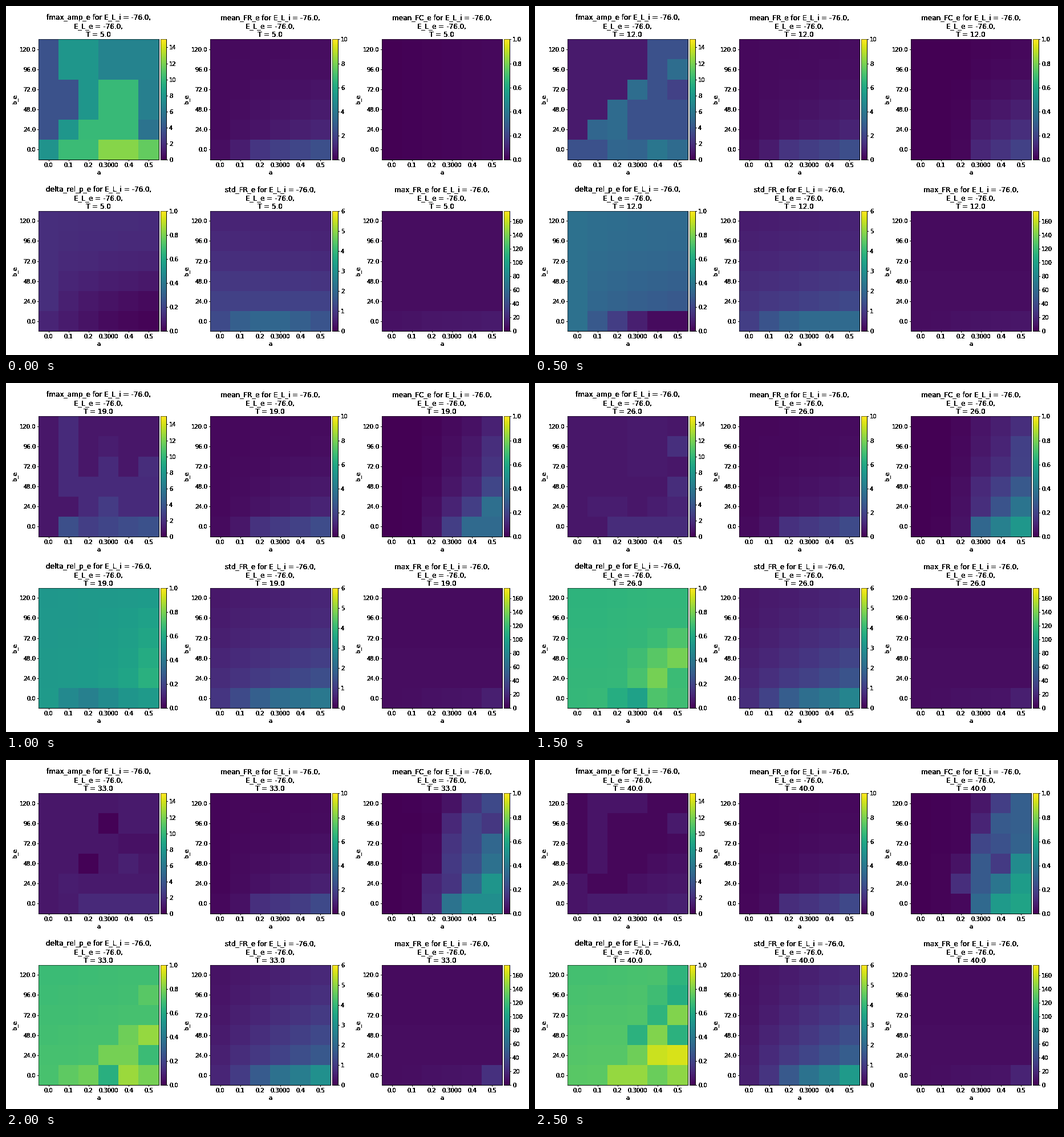
Animation, 917 px wide and 611 px high, one loop 3 s. Source, as a matplotlib script:

```python
import numpy as np
import matplotlib.pyplot as plt
from matplotlib.animation import FuncAnimation

W, H, DPI = 917, 611, 64
N, FRAMES = 6, 6
SIDE = 210.6
LEFTS, TOPS = (57, 358, 659), (58.4, 358.8)
ROW = np.arange(N)
COL = ROW / (N - 1)


def pt(px):
    return px * 72 / DPI


plt.rcParams.update({
    "font.family": "DejaVu Sans",
    "font.size": pt(10),
    "axes.titlesize": pt(12),
    "axes.titlepad": pt(4.17),
    "axes.labelpad": pt(2.78),
    "axes.linewidth": pt(0.556),
})
for axis in ("xtick", "ytick"):
    plt.rcParams.update({
        f"{axis}.major.size": pt(2.43),
        f"{axis}.major.pad": pt(2.43),
        f"{axis}.major.width": pt(0.556),
    })


def put(grid, patches):
    """Each patch is (row or rows, first column, values along the row)."""
    for row, col, vals in patches:
        grid[row, col:col + len(vals)] = vals
    return grid


def mix(a, b, u):
    return a + (b - a) * u


def surface(left, right):
    """Straight ramp along each row between two edge profiles."""
    return mix(left[:, None], right[:, None], COL[None, :])


# Grids run from b_e = 120 (row 0) down to b_e = 0 (row 5).
def amp_start():
    return put(np.full((N, N), 3.8), [
        (slice(0, 2), 1, [7.9] * 2 + [6.7] * 3),
        (slice(2, 4), 2, [7.9] + [10.1] * 2 + [6.4]),
        (4, 1, [7.9] + [10.1] * 3 + [5.7]),
        (5, 0, [7.7] + [10.2] * 2 + [12.3] * 2 + [11.4]),
    ])


def amp_diagonal():
    grid = np.full((N, N), 1.0)
    for row, first in enumerate((4, 4, 4, 3, 3, 0)):
        grid[row, first:] = 3.7
    return put(grid, [
        (1, 5, [5.3]), (2, 3, [5.3]), (2, 5, [2.9]), (3, 2, [5.2]),
        (4, 1, [4.9, 5.2]), (5, 2, [4.9, 4.8, 5.9, 5.2]),
    ])


def amp_branch():
    grid = np.full((N, N), 0.9)
    grid[:4, 1] = grid[3:5, 2:] = 1.8
    return put(grid, [
        (1, 3, [1.2]), (2, 3, [1.8]), (2, 5, [1.9]),
        (4, 3, [2.6]), (5, 1, [3.6, 2.7, 3.1, 3.4, 3.7]),
    ])


def amp_corner():
    grid = np.full((N, N), 0.9)
    grid[:3, 3:5] = 1.0
    grid[5, 2:] = 1.85
    return put(grid, [
        (1, 5, [2.0]), (3, 5, [1.9]), (4, 1, [1.2] * 2),
        (4, 4, [1.2, 1.5]),
    ])


def amp_holes():
    grid = np.full((N, N), 0.9)
    grid[:2, 4:] = grid[4, 2:] = 1.0
    grid[5, 2:] = 1.7
    return put(grid, [
        (1, 3, [0.1]), (2, 4, [0.7] * 2), (3, 2, [0.1]), (3, 4, [1.3]),
        (4, 1, [1.2]), (5, 1, [1.1]),
    ])


def amp_end():
    grid = np.full((N, N), 0.25)
    grid[:4, 1] = grid[0, 2:4] = grid[4:, 0] = 0.8
    grid[5, 1:] = 1.1
    return put(grid, [
        (1, 5, [1.0]), (2, 5, [0.4]), (3, 4, [0.5, 0.7]),
        (4, 3, [0.6, 0.8, 0.9]), (5, 5, [1.3]),
    ])


AMP = (amp_start, amp_diagonal, amp_branch, amp_corner, amp_holes, amp_end)


def fmax_amp(k):
    return AMP[k]()


def mean_rate(k):
    slope = 0.1 + 0.04 * ROW ** 2
    grid = 0.25 - 0.025 * k + np.outer(slope, COL)
    first = np.array([0.38, 0.8, 1.55, 1.85, 2.1, 2.4])
    last = np.array([0.18, 0.35, 1.28, 1.45, 1.72, 2.15])
    grid[5] = mix(first, last, k / 5)
    return grid


# Profile at a = 0.5, shares of it at a = 0.2 to 0.4, exceptions.
FC = [
    (0.02 + 0.007 * ROW ** 2, [0.1, 0.55, 0.75], []),
    ([0.09, 0.13, 0.15, 0.21, 0.36, 0.34], [0.1, 0.27, 0.5],
     [(5, 2, [0.05, 0.18, 0.34])]),
    (0.13 + 0.016 * ROW ** 2, [0.14, 0.42, 0.66],
     [(1, 4, [0.1, 0.19]), (4, 2, [0.04, 0.13]), (5, 2, [0.05, 0.33, 0.43])]),
    ([0.22, 0.16, 0.33, 0.37, 0.52, 0.49], [0.07, 0.45, 0.65],
     [(0, 3, [0.05]), (1, 3, [0.11, 0.21]), (4, 2, [0.1, 0.15]),
      (5, 2, [0.11, 0.38, 0.49])]),
    ([0.3, 0.3, 0.31, 0.48, 0.55, 0.58], [0.04, 0.58, 0.8],
     [(0, 3, [0.06, 0.18]), (1, 3, [0.1, 0.28]), (2, 3, [0.21]),
      (3, 2, [0.05, 0.28, 0.17]), (4, 2, [0.13, 0.28, 0.39]),
      (5, 4, [0.54])]),
]


def mean_fc(k):
    if k == 0:
        return np.tile(0.02 * COL, (N, 1))
    edge, shares, patches = FC[k - 1]
    return put(np.outer(edge, [0, 0.02] + shares + [1]), patches)


POWER = {
    2: [(5, 1, [0.47, 0.43, 0.48, 0.52, 0.54])],
    3: [(2, 4, [0.68, 0.72]), (3, 3, [0.69, 0.74, 0.79]),
        (4, 3, [0.71, 0.79, 0.68]), (5, 2, [0.62, 0.57, 0.72, 0.69])],
    4: [(1, 5, [0.74]), (3, 4, [0.78, 0.84]), (4, 3, [0.79, 0.79, 0.68]),
        (5, 1, [0.75, 0.78, 0.63, 0.85, 0.79])],
    5: [(0, 5, [0.65]), (1, 4, [0.69, 0.62]), (2, 4, [0.65, 0.81]),
        (3, 3, [0.64, 0.81, 0.64]), (4, 3, [0.78, 0.92, 0.94]),
        (5, 2, [0.84, 0.84, 0.77, 0.83])],
}


def rel_power(k):
    level = (0.13, 0.37, 0.53, 0.645, 0.68, 0.7)[k]
    if k == 0:
        grid = level - np.outer(0.01 + 0.006 * ROW ** 2, COL ** 0.55)
        grid[5] = 0.01 + 0.09 * (1 - COL) ** 1.6
        return grid
    if k == 1:
        grid = level - np.outer(0.03 + 0.004 * ROW ** 2, COL ** 0.55)
        grid[5] = 0.03 + 0.34 * np.clip(1 - 1.4 * COL, 0, 1)
        return grid
    grid = level + 0.002 * (k - 1) * ROW[:, None] + 0.015 * COL[None, :]
    if k == 2:
        grid += 0.02 * np.outer(ROW, COL ** 4)
    return put(grid, POWER[k])


def std_rate(k):
    u = k / (FRAMES - 1)
    left = mix(0.6 + 0.07 * ROW + 0.017 * ROW ** 2,
               0.25 + 0.012 * ROW ** 2, u ** 0.6)
    right = mix(0.55 + 0.04 * ROW ** 2,
                0.7 + 0.13 * ROW + 0.033 * ROW ** 2, u)
    grid = surface(left, right)
    first = np.array([1.35, 1.8, 1.95, 1.95, 1.8, 1.55])
    last = np.array([0.5, 0.9, 1.65, 2.25, 2.65, 3.25])
    grid[5] = mix(first, last, u ** 0.75)
    return grid


def max_rate(k):
    grid = np.full((N, N), 5.5 - 0.1 * k)
    grid[3:5] += 0.5
    grid[5] = (6 if k else 8) + 4 * COL
    grid[5, 5] = (12, 10, 15, 15, 24, 17)[k]
    return grid


# name, data, colour limit, colour bar step
PANELS = [
    ("fmax_amp_e", fmax_amp, 15, 2),
    ("mean_FR_e", mean_rate, 10, 2),
    ("mean_FC_e", mean_fc, 1, 0.2),
    ("delta_rel_p_e", rel_power, 1, 0.2),
    ("std_FR_e", std_rate, 6, 1),
    ("max_FR_e", max_rate, 175, 20),
]


def harden(img, dpi):
    """Make soft edges solid."""
    out = img.copy()
    out[..., 3] = out[..., 3] > 0.15
    return np.clip(out + 0.5 / 255, 0, 1), 0, 0


def add_axes(x, y, w):
    ax = fig.add_axes([x / W, 1 - (y + SIDE) / H, w / W, SIDE / H])
    ax.patch.set_visible(False)
    ax.set_agg_filter(harden)
    return ax


def add_panel(i, data, vmax, step):
    x, y = LEFTS[i % 3], TOPS[i // 3]
    ax = add_axes(x, y, SIDE)
    mesh = ax.pcolormesh(data(0), cmap="viridis", vmin=0, vmax=vmax)
    ax.set_ylim(N, 0)
    names = [f"{j / 10:.1f}" for j in range(N)]
    names[3] = "0.3000"
    ax.set_xticks(ROW + 0.5, names)
    ax.set_yticks(ROW + 0.5, [f"{24 * j:.1f}" for j in ROW[::-1]])
    ax.set_xlabel("a")
    ax.set_ylabel("b_e")
    cax = add_axes(x + SIDE + 2.9, y, 10.6)
    fig.colorbar(mesh, cax=cax, ticks=np.arange(0, vmax + step / 100, step))
    return ax, mesh


fig = plt.figure(figsize=(W / DPI, H / DPI), dpi=DPI, facecolor="white")
views = [add_panel(i, *panel[1:]) for i, panel in enumerate(PANELS)]


def draw(k):
    for (ax, mesh), (name, data, _, _) in zip(views, PANELS):
        mesh.set_array(data(k))
        ax.set_title(f"{name} for E_L_i = -76.0,\nE_L_e = -76.0,\nT = {5 + 7 * k:.1f}")
    return [mesh for _, mesh in views]


anim = FuncAnimation(fig, draw, frames=FRAMES, interval=500, repeat=True,
                     repeat_delay=0, blit=False)
plt.show()
```
